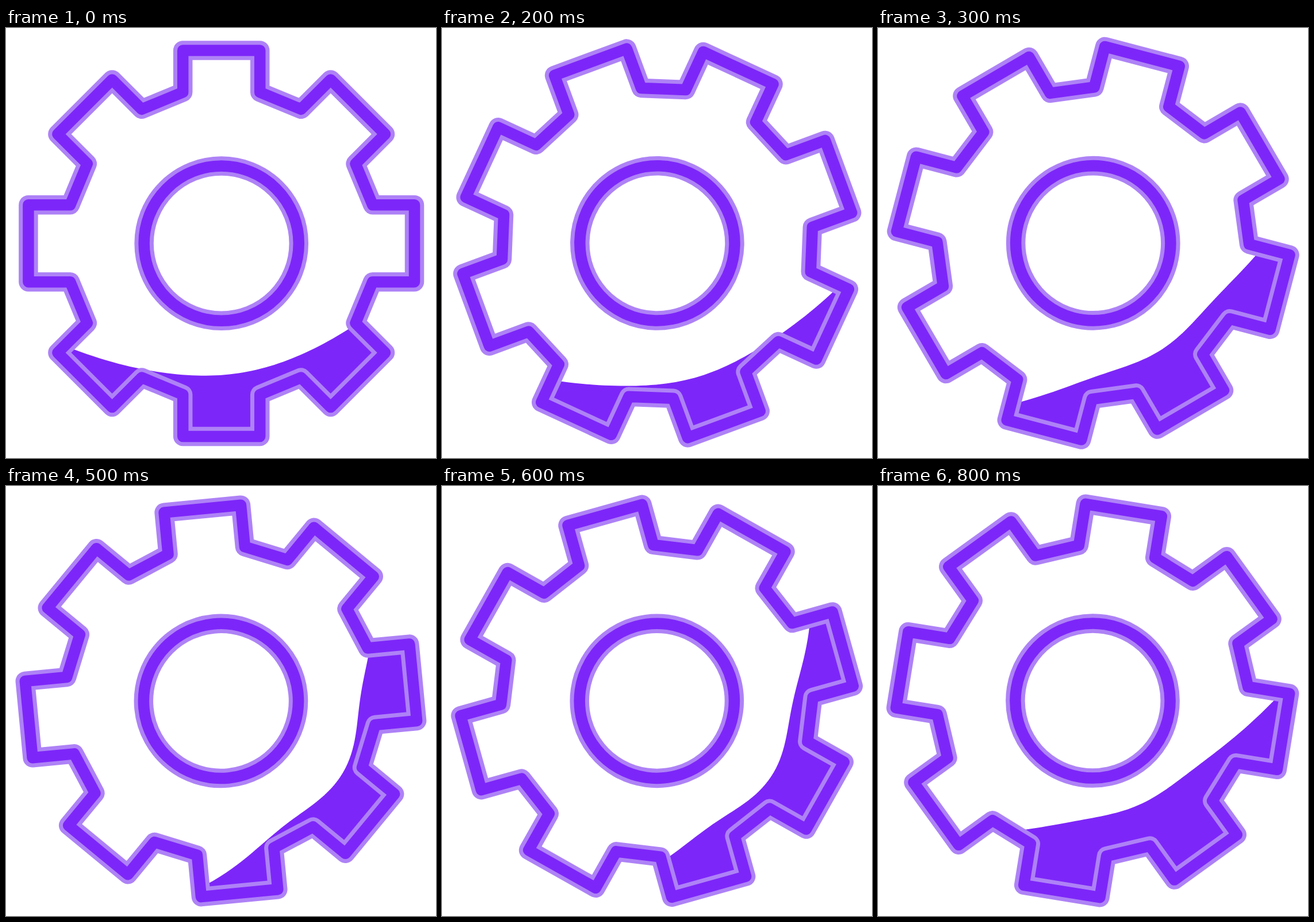
Animation, 748 px wide and 748 px high, one loop 0.9 s. Source, as an HTML page:

```html
<!DOCTYPE html>
<html lang="en">
<head>
<meta charset="utf-8">
<title>Gear loader</title>
<style>
  html, body { margin: 0; width: 100%; height: 100%; overflow: hidden; background: #fff; }
  svg { display: block; width: 100%; height: 100%; }
  .line { fill: none; stroke-linejoin: round; }
  .glow { stroke: #ae82f6; stroke-width: 33.5; }
  .core { stroke: #7d26f9; stroke-width: 19.5; }
  #liquid { fill: #7d26f9; }
</style>
</head>
<body>
<svg viewBox="0 0 748 748">
  <defs>
    <path id="gear"/>
    <clipPath id="inside"><use href="#gear" class="spin"/></clipPath>
  </defs>
  <g clip-path="url(#inside)"><path id="liquid" transform="translate(374 374)"/></g>
  <g class="spin">
    <use href="#gear" class="line glow"/>
    <use href="#gear" class="line core"/>
    <circle r="134.6" class="line glow"/>
    <circle r="134.6" class="line core"/>
  </g>
</svg>
<script>
const STEP = 100, STEPS = 9, TEETH = 8;
const HALF = 67, TOP = 335.8, BASE = 263;
const TURN_PER_STEP = -10.1, DRIFT_PER_STEP = -0.15;
const SPAN = 80, FAR = 600;

const rad = deg => deg * Math.PI / 180;
const sin = deg => Math.sin(rad(deg));
const cos = deg => Math.cos(rad(deg));
const point = (x, y) => `${x.toFixed(2)} ${y.toFixed(2)}`;

function gearPath() {
  const tooth = [[-HALF, -BASE], [-HALF, -TOP], [HALF, -TOP], [HALF, -BASE]];
  const points = [];
  for (let i = 0; i < TEETH; i++) {
    const a = i * 360 / TEETH;
    for (const [x, y] of tooth) {
      points.push(point(x * cos(a) - y * sin(a), x * sin(a) + y * cos(a)));
    }
  }
  return `M${points.join('L')}Z`;
}

// The surface is a polar curve around the hub; angles run from straight down to the right.
function liquidPath(step) {
  const phase = 360 * step / STEPS;
  const lean = (1 - cos(phase - 30)) / 2;
  const swell = cos(2 * phase - 80);
  const tilt = 6 + 54 * lean;
  const depth = 224 + 14 * sin(phase) + 22 * swell;
  const bend = 0.7 - 0.08 * swell;

  const polar = (offset, r) => point(r * sin(tilt + offset), r * cos(tilt + offset));
  const surface = [];
  for (let d = -SPAN; d <= SPAN; d += 2) {
    surface.push(polar(d, depth / cos(bend * d) + 10 * lean * cos(5 * d)));
  }
  return `M${surface.join('L')}L${polar(SPAN, FAR)}A${FAR} ${FAR} 0 0 1 ${polar(-SPAN, FAR)}Z`;
}

const liquid = document.getElementById('liquid');
const spinning = document.querySelectorAll('.spin');
document.getElementById('gear').setAttribute('d', gearPath());

const start = performance.now();
let shown = -1;

function draw(now) {
  const step = Math.floor(Math.max(0, now - start) / STEP) % STEPS;
  if (step !== shown) {
    shown = step;
    const centre = 374.7 + DRIFT_PER_STEP * step;
    const place = `translate(${centre} ${centre}) rotate(${TURN_PER_STEP * step})`;
    spinning.forEach(el => el.setAttribute('transform', place));
    liquid.setAttribute('d', liquidPath(step));
  }
  requestAnimationFrame(draw);
}
draw(start);
</script>
</body>
</html>
```
